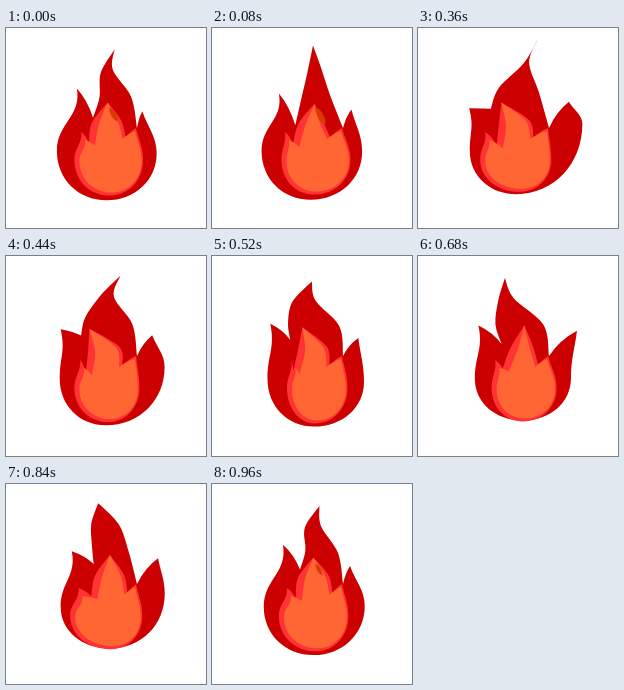
An HTML page with a canvas that plays this animation: 200 px wide and 200 px high, repeating every 1 s.

```html
<!DOCTYPE html>
<html lang="en">
<head>
<meta charset="utf-8">
<title>Flame</title>
<style>
  html, body { margin: 0; width: 100%; height: 100%; overflow: hidden; background: #fff; }
  canvas { display: block; width: 100vw; height: 100vh; }
</style>
</head>
<body>
<canvas id="stage" width="200" height="200"></canvas>
<script>
const ctx = document.getElementById('stage').getContext('2d');
const LOOP = 1000, STEP = 40, LAG = 20;

// Periodic sway: a mean plus cosine and sine amplitudes, harmonic by harmonic
const sway = phase => (mean, ...amps) => amps.reduce((sum, amp, i) => {
  const angle = phase * ((i >> 1) + 1);
  return sum + amp * (i % 2 ? Math.sin(angle) : Math.cos(angle));
}, mean);

// Bends are [fraction along the edge, sideways offset]
const outerFlame = w => ({
  leftTip:   [w(60.6, 6, -5.5, 3.7), w(70.5, -3.3, 6.4, -6)],
  leftDip:   [w(81, 4, -6.4, 1.3), w(87, 4, 3, 1, 7)],
  leftBend:  [[.3, w(-4.3, 4.4, .7)], [.66, w(-2.5, 3.3, 7, -6, 2.3)]],
  tip:       [w(100, -.5, 9, 3.8, -9.5, 4.5), w(18, -2.2, -6, 5.2)],
  rightBend: [[.26, w(0, 5.2, -1, -5.8, 3.8, -6.7)], [.6, w(2.8, -3.3, -9.2, 2.7, 1)]],
  rightDip:  [131, 100],
  rightTip:  [w(149, -5, -2.3, -7.7, 2.3), w(77, .7, -.6, 5.7)],
  left:  [w(53, -2.5, -3), 123],
  base:  [w(101, -1, -4), w(167.6, 1, 1, 4)],
  right: [w(156, -1, 3, -5, -3.5), w(114, 0, -9, 12, 6)],
  hook: 5
});

const coreFlame = w => ({
  leftTip:   [w(77, -2.3, -4.6, 4.3, 1.2), 112],
  leftDip:   [w(88, .5, -3.5), w(118, 0, 3)],
  leftBend:  [[.5, w(1, -3.2, 1.4)]],
  tip:       [w(97.4, 5.8, -8, -1.2, 5.2), w(73, 1.8, 3)],
  rightBend: [[.5, w(3.3, -3.7, 1.2, 1.7, -4.6)]],
  rightDip:  [w(115.5, 1, -3), 111],
  rightTip:  [129, 103],
  left:  [w(73, -3, -3, 4, 3.5), 133],
  base:  [w(105, 0, -2), w(162.5, 0, -1, 2)],
  right: [w(135, 1, -1, 0, 2), 133],
  hook: 1
});

const move = ([x, y], dx, dy) => [x + dx, y + dy];
const mix = (a, b, u, v = u) => [a[0] + (b[0] - a[0]) * u, a[1] + (b[1] - a[1]) * v];

// The red layer is the core, grown mostly to the left
const rimFlame = core => ({
  ...core,
  leftTip:   move(core.leftTip, -4, -8),
  leftDip:   move(core.leftDip, -6, -3),
  leftBend:  [[.5, core.leftBend[0][1] - 4]],
  rightBend: [[.5, core.rightBend[0][1] + 2]],
  rightDip:  move(core.rightDip, 3, -1),
  rightTip:  move(core.rightTip, 1, -3),
  left:  move(core.left, -5, -1),
  base:  move(core.base, -2, 3),
  right: move(core.right, 1.5, -1)
});

const edge = (from, bends, to) =>
  [from, ...bends.map(([u, off]) => move(mix(from, to, u), off, 0)), to];

function spline(pts) {
  const at = i => pts[Math.max(0, Math.min(pts.length - 1, i))];
  for (let i = 0; i < pts.length - 1; i++) {
    const a = at(i - 1), b = at(i), c = at(i + 1), d = at(i + 2);
    ctx.bezierCurveTo(b[0] + (c[0] - a[0]) / 6, b[1] + (c[1] - a[1]) / 6,
                      c[0] - (d[0] - b[0]) / 6, c[1] - (d[1] - b[1]) / 6, ...c);
  }
}

function fillFlame(f, color) {
  const { leftTip, rightTip, left, base, right } = f;
  const round = .57;
  ctx.beginPath();
  ctx.moveTo(...leftTip);
  ctx.quadraticCurveTo(...mix(leftTip, f.leftDip, .63, .37), ...f.leftDip);
  spline(edge(f.leftDip, f.leftBend, f.tip));
  spline(edge(f.tip, f.rightBend, f.rightDip));
  ctx.quadraticCurveTo(...mix(f.rightDip, rightTip, .37, .63), ...rightTip);
  ctx.bezierCurveTo(...mix(rightTip, right, .4), ...mix(right, rightTip, 0, .4), ...right);
  ctx.bezierCurveTo(...mix(right, base, 0, round), ...mix(base, right, round, 0), ...base);
  ctx.bezierCurveTo(...mix(base, left, round, 0), ...mix(left, base, 0, round), ...left);
  ctx.bezierCurveTo(...mix(left, leftTip, 0, .45),
                    ...move(mix(leftTip, left, 0, .45), f.hook, 0), ...leftTip);
  ctx.fillStyle = color;
  ctx.fill();
}

// Dark sliver just below the core tip
function fillEmber([x, y], size) {
  if (size < .5) return;
  ctx.beginPath();
  ctx.moveTo(x - size * .5, y - size);
  ctx.quadraticCurveTo(x + size * .6, y - size * .5, x + size * .7, y + size);
  ctx.quadraticCurveTo(x - size * .4, y + size * .5, x - size * .5, y - size);
  ctx.fillStyle = '#d63c00';
  ctx.fill();
}

function draw(now) {
  const t = Math.floor(now % LOOP / STEP) * STEP;
  const w = sway((t - LAG) / LOOP * 2 * Math.PI);
  const core = coreFlame(w);
  ctx.fillStyle = '#fff';
  ctx.fillRect(0, 0, 200, 200);
  fillFlame(outerFlame(w), '#cc0000');
  fillFlame(rimFlame(core), '#ff3333');
  fillFlame(core, '#ff6633');
  fillEmber(move(core.tip, 5, 12), w(1, 7, 4));
}

let start;
function tick(now) {
  start ??= now;
  draw(now - start);
  requestAnimationFrame(tick);
}
draw(0);
requestAnimationFrame(tick);
</script>
</body>
</html>
```
